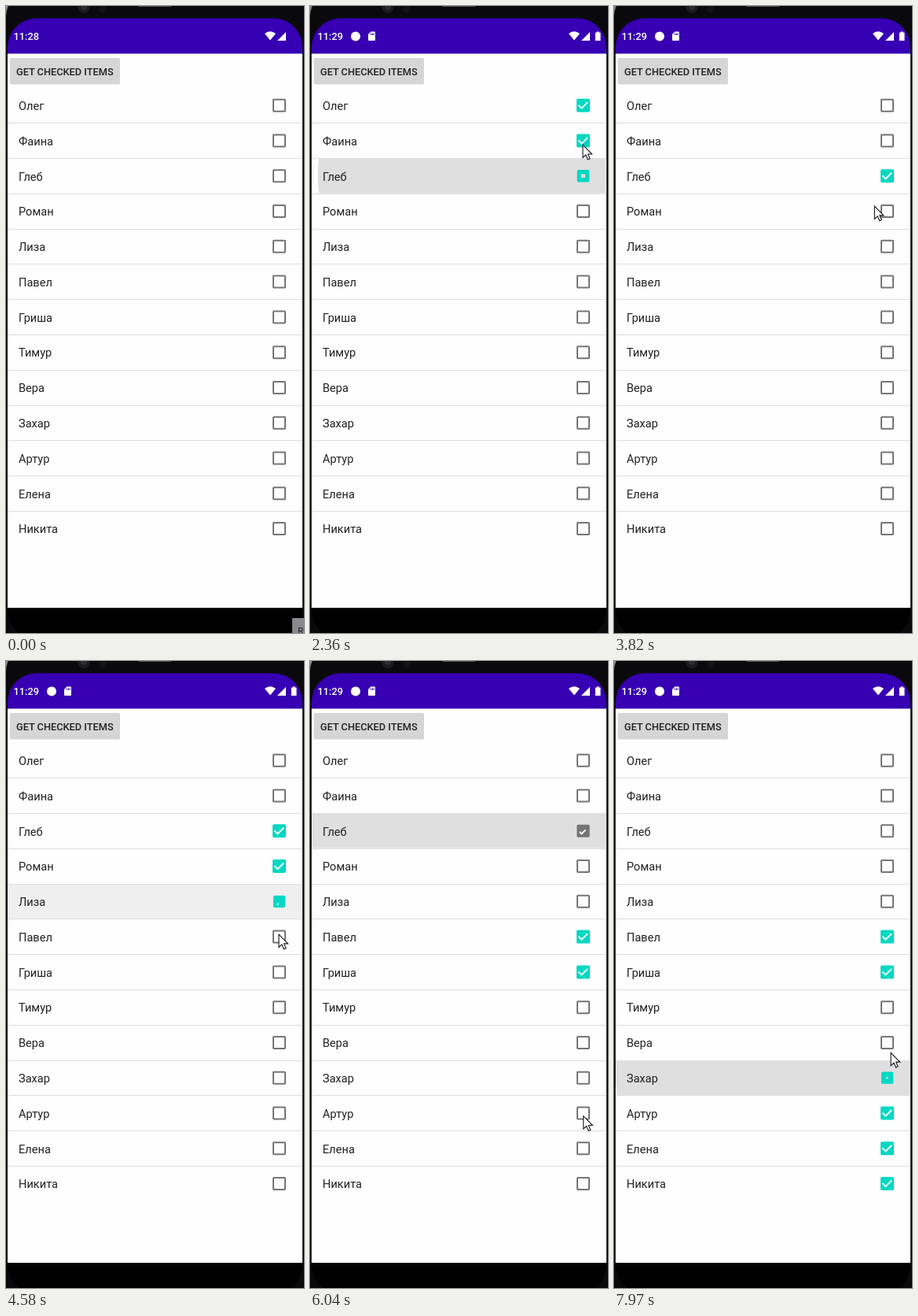
An HTML page for the animation above (8 s loop, 379 px wide and 796 px high).

```html
<!DOCTYPE html>
<html lang="ru">
<head>
<meta charset="utf-8">
<style>
html, body { margin: 0; width: 100%; height: 100%; overflow: hidden; background: #0a0a0d; }
svg { display: block; width: 379px; height: 796px; font-family: Roboto, "Noto Sans", sans-serif; }
.name { font-size: 14.6px; fill: #212121; }
.caps { font-size: 12.77px; font-weight: 500; }
</style>
</head>
<body>
<svg viewBox="0 0 379 796">
  <defs>
    <clipPath id="screen"><rect x="2" y="15.5" width="375" height="788" rx="37"/></clipPath>
  </defs>
  <rect width="379" height="796" fill="#0a0a0d"/>
  <path d="M0 0H3Q1 4 0 12Z" fill="#85858a"/>
  <circle cx="99" cy="1" r="8" fill="#1b1b1f"/>
  <circle cx="99" cy="1" r="4" fill="#2b2b31"/>
  <circle cx="123" cy="4" r="5" fill="#131316"/>
  <rect x="168" y="-4" width="43" height="5" rx="2" fill="#55555a"/>
  <g clip-path="url(#screen)">
    <rect y="15" width="379" height="781"/>
    <rect y="60" width="379" height="704" fill="#fefefe"/>
    <rect y="15" width="379" height="45.5" fill="#3700b3"/>
  </g>
  <g fill="#fff">
    <text id="clock" class="caps" x="9.5" y="43"></text>
    <path d="M329 35Q336 29.5 343 35L336 43.5Z"/>
    <path d="M345 44L356 33V44Z"/>
    <g id="icons">
      <circle cx="58" cy="38.5" r="6"/>
      <path d="M77.5 32.5H82Q83 32.5 83 33.5V43Q83 44 82 44H75Q74 44 74 43V36Z"/>
      <path d="M77.7 34.5V37M79.5 34.5V37M81.3 34.5V37" stroke="#3700b3"/>
      <path d="M364.7 32.5H367.7V33.7H369.5V44H362.8V33.7H364.7Z"/>
    </g>
  </g>
  <rect x="5" y="66" width="140" height="33.5" rx="2" fill="#d6d6d6"/>
  <text class="caps" x="13" y="87.5" fill="#212121">GET CHECKED ITEMS</text>
  <g id="rows"></g>
  <g id="tip">
    <rect x="364" y="777" width="15" height="19" fill="#88888d"/>
    <text x="371" y="797.5" font-size="12" fill="#242428">R</text>
  </g>
  <g id="cursor">
    <circle id="halo" r="15" fill="#fff132" fill-opacity=".65"/>
    <path d="M0 0V16.3L3.8 12.8L6.4 18.7L9 17.5L6.5 11.8H11.6Z" fill="#fff" stroke="#15151c" stroke-width="1.1"/>
  </g>
</svg>
<script>
const LOOP = 8000, TOP = 104, PITCH = 44.78, BOX_X = 347.5;
const names = "Олег Фаина Глеб Роман Лиза Павел Гриша Тимур Вера Захар Артур Елена Никита".split(" ");

// runs of evenly timed clicks over neighbouring rows; dy is the pointer's height in a row
const sweeps = [
  { from: 0, to: 2, start: 1283, end: 2245, dy: 22 },
  { from: 1, to: 0, start: 2560, end: 2880, dy: 20 },
  { from: 3, to: 6, start: 4000, end: 5065, dy: 20 },
  { from: 4, to: 2, start: 5286, end: 5900, dy: 13 },
  { from: 12, to: 9, start: 6710, end: 7830, dy: 4 }
];
// pointer rests between the runs
const rests = [
  { time: 550, x: 351, y: 661 }, { time: 3260, x: 338, y: 67 }, { time: 3820, x: 331, y: 254 },
  { time: 6370, x: 348, y: 695 }, { time: 8200, x: 353, y: 495 }
];

const $ = id => document.getElementById(id);
const clamp = v => Math.max(0, Math.min(1, v));
const lerp = (a, b, p) => a + (b - a) * p;
const easeOut = p => 1 - (1 - clamp(p)) ** 4;
const set = (el, attrs) => { for (const k in attrs) el.setAttribute(k, attrs[k]); };
const show = (id, on) => set($(id), { visibility: on ? "visible" : "hidden" });
const add = (tag, attrs, parent) => {
  const el = document.createElementNS("http://www.w3.org/2000/svg", tag);
  set(el, attrs);
  return parent.appendChild(el);
};

const clicks = sweeps.flatMap(({ from, to, start, end, dy }) => {
  const n = Math.abs(to - from);
  return Array.from({ length: n + 1 }, (_, i) => {
    const row = lerp(from, to, i / n);
    return { row, time: lerp(start, end, i / n), x: 347, y: TOP + row * PITCH + dy };
  });
});
const stops = [...clicks, ...rests].sort((a, b) => a.time - b.time);

function cursorAt(t) {
  const i = Math.max(1, stops.findIndex(s => s.time > t));
  const a = stops[i - 1], b = stops[i], p = easeOut((t - a.time) / (b.time - a.time));
  return [lerp(a.x, b.x, p), lerp(a.y, b.y, p)];
}

const rows = names.map((name, i) => {
  const y = TOP + i * PITCH, g = $("rows");
  const clip = add("clipPath", { id: "row" + i }, g);
  add("rect", { x: 2, y, width: 375, height: PITCH - .5 }, clip);
  const wash = add("g", { "clip-path": `url(#row${i})` }, g);
  const ripple = add("circle", { fill: "#dfdfdf" }, wash);
  if (i < names.length - 1)
    add("rect", { x: 2, y: Math.ceil(y + PITCH - 1), width: 375, height: 1, fill: "#dedede" }, g);
  add("text", { x: 16, y: y + 28, class: "name" }, g).textContent = name;
  return {
    presses: clicks.filter(c => c.row === i), ripple, cy: y + 22.2,
    box: add("path", { "fill-rule": "evenodd" }, g),
    check: add("path", { fill: "none", stroke: "#fff", "stroke-width": 1.9 }, g)
  };
});

// rounded square around the checkbox centre
function square(cy, side, r) {
  const s = side - 2 * r, arc = (x, y) => `a${r} ${r} 0 0 1 ${x} ${y}`;
  return `M${BOX_X - s / 2} ${cy - side / 2}h${s}${arc(r, r)}v${s}${arc(-r, r)}h${-s}${arc(-r, -r)}v${-s}${arc(r, -r)}z`;
}

function drawRow({ presses, ripple, cy, box, check }, t) {
  const past = presses.filter(c => c.time <= t);
  const last = past[past.length - 1] || { time: -LOOP, y: cy };
  const age = t - last.time, p = easeOut(age / 225);
  set(ripple, { cx: lerp(266, 189, p), cy: last.y, r: 194 * p, opacity: 1 - clamp((age - 150) / 150) });

  // the tick animation follows the press by 40 ms and runs backwards to uncheck
  const on = (past.length - (age < 40)) % 2 === 1;
  const since = age < 40 ? LOOP : age - 40;
  const v = on ? since : 400 - since;
  const fill = clamp(v / 125), grow = clamp((v - 150) / 230);
  const side = 17 - 2.2 * (fill - grow), hole = 13 * (1 - fill);
  set(box, {
    d: square(cy, side, 1.7) + (hole > 0 ? square(cy, hole, 0) : ""),
    fill: on ? "#03d8c3" : "#757575"
  });
  const x = BOX_X - 2, y = cy + 3.6;
  set(check, {
    d: `M${x - 4 * grow} ${y - 4 * grow}L${x} ${y}L${x + 7.6 * grow} ${y - 7.6 * grow}`,
    opacity: grow > 0 ? 1 : 0
  });
}

function draw(t) {
  $("clock").textContent = t < 310 ? "11:28" : "11:29";
  show("icons", t >= 310);
  show("tip", t < 45);
  show("cursor", t >= 550);
  show("halo", clicks.some(c => t > c.time - 20 && t < c.time + 55));
  set($("cursor"), { transform: `translate(${cursorAt(t)})` });
  rows.forEach(r => drawRow(r, t));
}

const start = performance.now();
function tick() {
  draw((performance.now() - start) % LOOP);
  requestAnimationFrame(tick);
}
tick();
</script>
</body>
</html>
```
